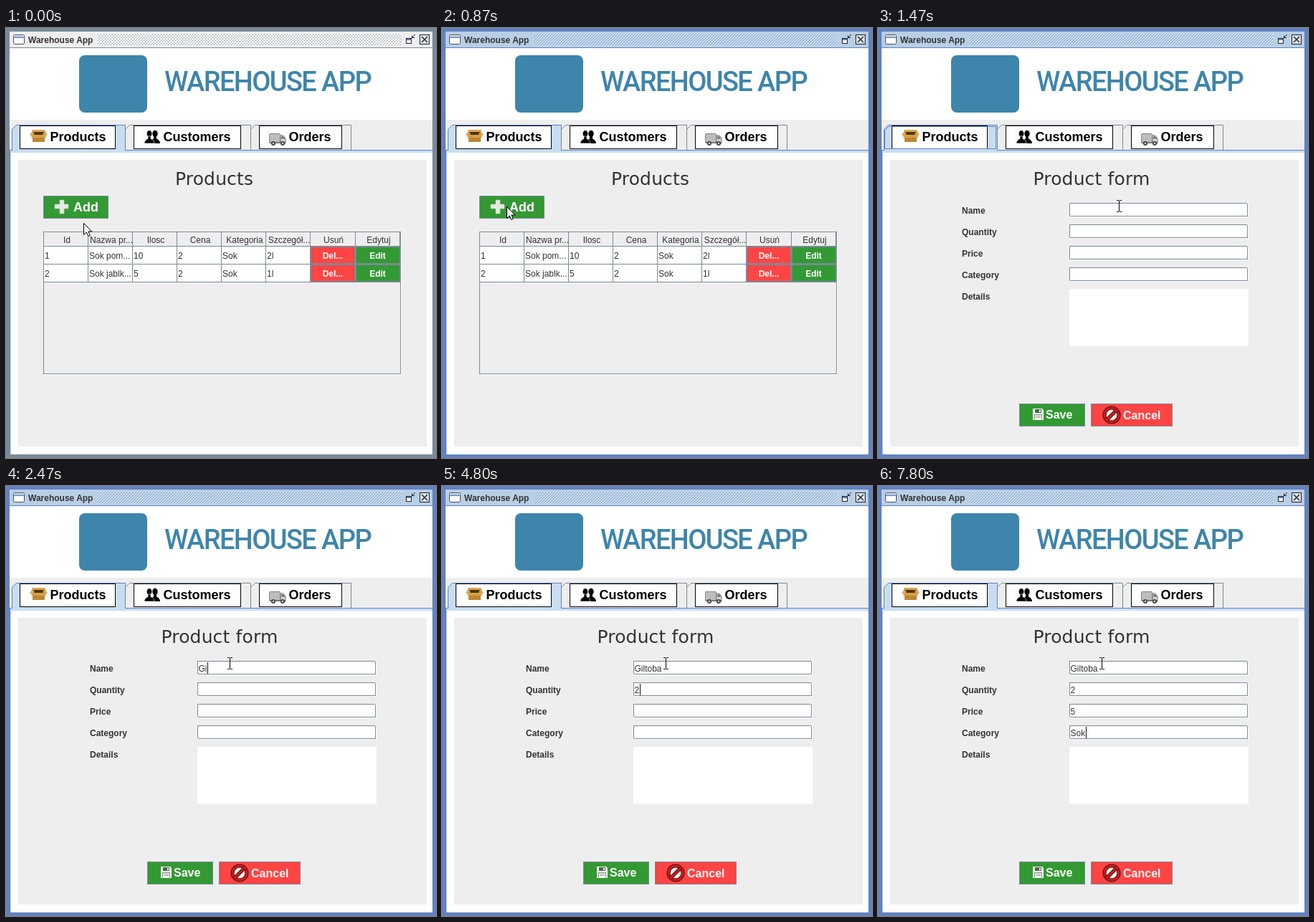
An HTML page that plays this animation: 600x600 px, repeating every 8 s.

```html
<!DOCTYPE html>
<html lang="en">
<head>
<meta charset="utf-8">
<title>Warehouse App</title>
<style>
  html, body { margin: 0; width: 100%; height: 100%; overflow: hidden; background: #fff; }
  svg { display: block; width: 600px; height: 600px; }
  text { font: 12px "Liberation Sans", Arial, sans-serif; fill: #333; white-space: pre; }
  text.bold { font-weight: 700; }
  text.btn { font-weight: 700; fill: #fff; }
  text.mid { text-anchor: middle; }
  text.tab { font-size: 18px; font-weight: 700; fill: #000; }
  text.big { font-size: 18px; font-weight: 700; fill: #fff; }
  text.act { font-size: 16px; font-weight: 700; fill: #fff; }
  text.head { font: 25px "DejaVu Sans", Verdana, sans-serif; letter-spacing: .15px; }
  text.brand { font: 500 38px Roboto, sans-serif; letter-spacing: -1.6px; fill: #3d85ab; }
  rect, .crisp { shape-rendering: crispEdges; }
  rect.smooth { shape-rendering: auto; }
</style>
</head>
<body>
<svg id="stage" viewBox="0 0 600 600" xmlns="http://www.w3.org/2000/svg"></svg>
<script>
const LOOP = 8000;
const GREY = '#7a8a99', BLUE = '#6382bf', PALE = '#c8ddf2', PANEL = '#eee';
const GREEN = '#339933', RED = '#ff4444';

const fill = (x, y, w, h, color, extra = '') =>
  `<rect x="${x}" y="${y}" width="${w}" height="${h}" fill="${color}" ${extra}/>`;
const box = (x, y, w, h, color, line = GREY) =>
  fill(x + .5, y + .5, w - 1, h - 1, color, `stroke="${line}"`);
const path = (d, color, extra = '') => `<path d="${d}" fill="${color}" ${extra}/>`;
const line = (d, color, extra = '') =>
  `<path d="${d}" fill="none" stroke="${color}" ${extra}/>`;
const text = (x, y, str, cls = '') => `<text x="${x}" y="${y}" class="${cls}">${str}</text>`;
const group = (id, body) => `<g id="${id}">${body}</g>`;

// Window frame and title bar
const bumps = (id, shadow) =>
  `<pattern id="${id}" x="127" y="8" width="4" height="4" patternUnits="userSpaceOnUse">` +
  fill(0, 0, 1, 1, '#fff') + fill(2, 2, 1, 1, '#fff') +
  fill(1, 1, 1, 1, shadow) + fill(3, 3, 1, 1, shadow) + '</pattern>';

const frame = (id, edge, title) => group(id,
  fill(0, 0, 600, 600, edge) + fill(5, 5, 590, 22, title) +
  fill(127, 8, 425, 17, `url(#${id}Bumps)`) + fill(5, 28, 590, 567, '#fff'));

function titleBar() {
  return '<rect class="smooth" x="10.5" y="9.5" width="15" height="13" rx="2" fill="#fff" stroke="#444c58"/>' +
    fill(12, 11, 12, 2, '#a3b8cc') + line('M11 13.5H25', BLUE) +
    text(31, 21, 'Warehouse App', 'bold') +
    box(558, 14, 8, 8, '#fff', '#222') + fill(559, 15, 6, 2, BLUE) +
    line('M571 9L566 14M566.500 10.500V13.500H570', '#222') +
    box(577, 9, 14, 14, '#dce8f5', '#222') +
    line('M580 12L588 20M588 12L580 20', '#333', 'stroke-width="1.7"');
}

function header() {
  return '<rect class="smooth" x="102" y="38" width="95" height="80" rx="8" fill="#3d85ab"/>' +
    text(221, 88, 'WAREHOUSE APP', 'brand');
}

// Tab icons
const boxIcon =
  path('M37 142H54L56 149H35Z', '#4d3513') +
  path('M37 142H54L55 145H36Z', '#dba64e') +
  path('M37 144L33 149L36 151L40 148Z', '#d9a550') +
  path('M54 144L58 149L55 151L51 148Z', '#d9a550') +
  path('M37 150H54V159H37Z', '#bd8633') +
  path('M37 149H54L56 153H35Z', '#d6a048');

const person = x =>
  `<ellipse cx="${x}" cy="147.500" rx="3.700" ry="4.700" fill="#000"/>` +
  path(`M${x - 7} 161Q${x - 7} 156.500 ${x - 2} 154.500V151H${x + 2}V154.500Q${x + 7} 156.500 ${x + 7} 161Z`, '#000');
const peopleIcon = person(208) +
  `<g stroke="#fff" stroke-width=".6">${person(200)}</g>`;

const wheel = x =>
  `<circle cx="${x}" cy="161" r="3" fill="#444"/><circle cx="${x}" cy="161" r="1.2" fill="#ddd"/>`;
const truckIcon =
  '<rect class="smooth" x="367.5" y="147.5" width="15" height="13" rx="1" fill="#bdbdbd" stroke="#858585"/>' +
  path('M383 150H387L390 154V161H383Z', '#d2d2d2', 'stroke="#777"') +
  path('M384.500 151.500H387L389 154.500H384.500Z', '#666') +
  fill(368, 159, 22, 2, '#777') + wheel(373) + wheel(386);

function tabs() {
  const outline = (x, r) => `M${x}.5 141.5L${x + 6}.5 135.5H${r}.5V170`;
  const button = (x, w, icon, tx, label) =>
    box(x, 136, w, 33, '#fff', '#000') + icon + text(tx, 158, label, 'tab');
  return fill(5, 128, 590, 43, PANEL) +
    line(outline(166, 341) + outline(341, 481), GREY) +
    line('M5 170.500H595', BLUE, 'class="crisp"') +
    fill(5, 171, 590, 3, PALE) + fill(6, 171, 1, 424, PALE) + fill(5, 170, 1, 425, BLUE) +
    path('M8 174V141L14 135H167V171Z', PALE) +
    line('M8.500 171V141.500L14.500 135.500H166.500V171', BLUE) +
    button(19, 134, boxIcon, 61.5, 'Products') +
    button(178, 150, peopleIcon, 219.5, 'Customers') +
    button(353, 116, truckIcon, 394.5, 'Orders') +
    group('ring', line('M9.500 168.500V142.500L14.500 137.500H164.500V168.500Z', BLUE)) +
    fill(17, 184, 570, 400, PANEL);
}

// Product list
const cols = [52, 114, 176, 238, 300, 362, 424, 487];
const rows = [
  ['1', 'Sok pom...', '10', '2', 'Sok', '2l'],
  ['2', 'Sok jablk...', '5', '2', 'Sok', '1l']
];
const titles = ['Id', 'Nazwa pr...', 'Ilosc', 'Cena', 'Kategoria', 'Szczegół...', 'Usuń', 'Edytuj'];

function listPage() {
  let out = text(236, 219, 'Products', 'head') +
    box(52, 234, 91, 32, GREEN) +
    path('M75 240H81V246H87V252H81V259H75V252H68V246H75Z', '#e4e9e4', 'stroke="#bcc9bc" stroke-width=".6"') +
    text(94, 256, 'Add', 'big') +
    box(52, 284, 499, 199, PANEL) + line('M53 483.500H552M551.500 285V484', '#fff') +
    fill(53, 305, 497, 49, '#fff');
  titles.forEach((name, i) => out += text(cols[i] + 33, 300, name, 'mid'));
  rows.forEach((row, r) => {
    const y = 305 + r * 25;
    row.forEach((cell, i) => out += text(cols[i] + 2, y + 17, cell));
    out += box(425, y, 62, 24, RED) + text(456, y + 17, 'Del...', 'btn mid') +
      box(488, y, 62, 24, GREEN) + text(518.5, y + 17, 'Edit', 'btn mid');
  });
  const grid = cols.slice(1).concat(549).map(x => `M${x + .5} 285V355`).join('');
  return out + line(grid + 'M53 304.500H550M53 329.500H550M53 354.500H550', GREY, 'class="crisp"');
}

// Product form
const labels = ['Name', 'Quantity', 'Price', 'Category', 'Details'];
const fieldX = 269;
const rowY = i => 244 + i * 30;

// Sunken text field: dark outline, white lower edge, two blank corners
const field = y =>
  fill(268, y + 1, 249, 19, '#fff') + box(267, y, 249, 19, '#fff') +
  fill(515, y, 2, 1, PANEL) + fill(267, y + 18, 1, 2, PANEL);

function formPage() {
  let out = text(216.5, 219, 'Product form', 'head');
  labels.forEach((name, i) => {
    const y = rowY(i);
    out += text(117, y + 15, name, 'bold');
    if (i < 4) out += field(y) + `<text id="field${i}" x="${fieldX - .5}" y="${y + 15}"></text>`;
  });
  return out + fill(267, 364, 250, 80, '#fff') +
    fill(0, 246, 1, 16, '#111', 'id="caret"') +
    box(197, 524, 92, 32, GREEN) +
    path('M216 531H229L231 533V547H216Z', '#f4f4f4') +
    fill(219, 532, 9, 5, '#4a6a4a') + fill(225, 533, 2, 3, '#fff') +
    fill(218, 539, 11, 7, '#789078') + fill(219, 540, 9, 6, '#fff') +
    line('M220 541.500H227M220 543.500H227', '#999') +
    text(234, 545, 'Save', 'act') +
    box(297, 524, 114, 32, RED) +
    '<circle cx="326" cy="540" r="10" fill="#eee" stroke="#3b0505" stroke-width="5"/>' +
    '<circle cx="326" cy="540" r="10" fill="none" stroke="#c51c1c" stroke-width="3.4"/>' +
    line('M319 547L333 533', '#3b0505', 'stroke-width="5"') +
    line('M318.500 547.500L333.500 532.500', '#c51c1c', 'stroke-width="3.4"') +
    text(342, 546, 'Cancel', 'act');
}

const pointers =
  group('arrow', path('M.5 .5V16.500L4.300 12.900L6.800 18.500L9.300 17.400L6.900 12H11.800Z', '#fff', 'stroke="#000"')) +
  group('beam', line('M-3 -7.500H0M1 -7.500H4M.500 -7V8M-3 8.500H0M1 8.500H4', '#000', 'class="crisp"'));

const $ = id => document.getElementById(id);
$('stage').innerHTML =
  `<defs>${bumps('idleBumps', GREY)}${bumps('activeBumps', BLUE)}</defs>` +
  frame('idle', GREY, PANEL) + frame('active', BLUE, '#b8cfe5') +
  titleBar() + header() + tabs() +
  group('list', listPage()) + group('form', formPage()) + pointers;

// Pointer stops: time, x, y
const moves = [
  [0, 108, 272], [70, 106, 269], [130, 102, 263], [200, 97, 256], [330, 92, 251], [400, 90, 249],
  [1130, 97, 250], [1200, 122, 251], [1270, 172, 249], [1330, 236, 247],
  [1400, 298, 248], [1470, 336, 248], [1530, 326, 247], [1600, 316, 247], [1730, 312, 247]
];

// Typing: time, field, letters shown, caret visible
const words = ['Giltoba', '2', '5', 'Sok'];
const typing = [
  [1600, 0, 0, 1], [2070, 0, 0, 0], [2200, 0, 1, 1], [2470, 0, 2, 1], [2800, 0, 3, 1],
  [3000, 0, 4, 1], [3330, 0, 5, 1], [3730, 0, 6, 1], [3800, 0, 7, 1],
  [4000, 1, 0, 1], [4530, 1, 0, 0], [4800, 1, 1, 1],
  [5130, 2, 0, 1], [5670, 2, 0, 0], [5730, 2, 1, 1],
  [6130, 3, 0, 1], [6670, 3, 0, 0], [7130, 3, 0, 1], [7270, 3, 1, 1], [7470, 3, 2, 1], [7800, 3, 3, 1]
];

const pen = document.createElement('canvas').getContext('2d');
pen.font = '12px "Liberation Sans", Arial, sans-serif';

const show = (id, on) => { $(id).style.display = on ? '' : 'none'; };
const latest = (steps, t) => steps.filter(s => s[0] <= t).pop();

function render(t) {
  const inForm = t >= 930;
  show('active', t >= 870);
  show('list', !inForm);
  show('form', inForm);
  show('ring', inForm && t < 1600);

  const [, x, y] = latest(moves, t);
  const overField = inForm && x >= 267 && x < 516 && y >= 244 && y < 264;
  show('arrow', !overField);
  show('beam', overField);
  $(overField ? 'beam' : 'arrow').setAttribute('transform', `translate(${x} ${y})`);

  const [, active, count, lit] = latest(typing, t) || [0, 0, 0, 0];
  words.forEach((word, i) => {
    $('field' + i).textContent = i < active ? word : i > active ? '' : word.slice(0, count);
  });
  const width = pen.measureText(words[active].slice(0, count)).width;
  $('caret').setAttribute('x', Math.round(fieldX + width));
  $('caret').setAttribute('y', rowY(active) + 2);
  show('caret', lit);
}

const start = performance.now();
function tick() {
  render((performance.now() - start) % LOOP);
  requestAnimationFrame(tick);
}
tick();
</script>
</body>
</html>
```
